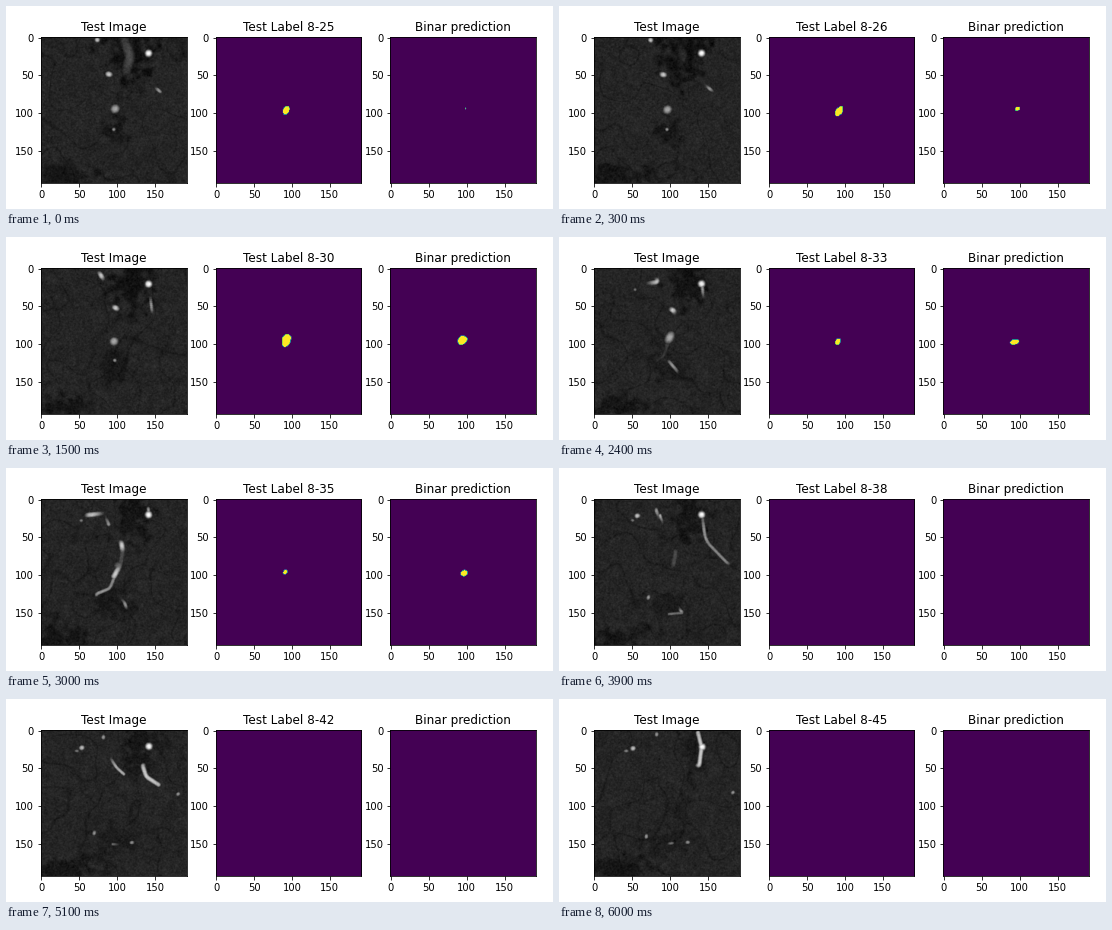
Recreate the animation shown at these times as a matplotlib script. Size 547 px wide and 203 px high, loop 6300 ms.

```python
import numpy as np
import matplotlib.pyplot as plt
from matplotlib.animation import FuncAnimation

W, H, DPI = 547, 203, 72
N, FRAMES, STEP = 192, 21, 300
FIRST, LAST_LABEL = 25, 36
SIDE, LEFT, BOTTOM = 145.6, 35.0, 26.2
THICK = 1.5  # slice thickness, in slices

rng = np.random.default_rng(8)
yy, xx = np.mgrid[0:N, 0:N].astype(float)


def smooth_noise(scale, depth):
    """Unit-variance volume noise, blurred in plane and across slices."""
    f = np.fft.fftn(rng.standard_normal((FRAMES, N, N)))
    fz, fy, fx = np.meshgrid(np.fft.fftfreq(FRAMES), np.fft.fftfreq(N),
                             np.fft.fftfreq(N), indexing="ij")
    f *= np.exp(-2 * np.pi**2 * (scale**2 * (fx**2 + fy**2) + depth**2 * fz**2))
    v = np.fft.ifftn(f).real
    return v / v.std()


folds = smooth_noise(13, 1.2)
wobble = smooth_noise(3, .7)
grain = smooth_noise(.6, 0)


def tube(radius, light, *keys):
    """A vessel in space through (x, y, slice) points, corners rounded."""
    keys = np.array(keys, float)
    t = np.linspace(0, len(keys) - 1, 24 * (len(keys) - 1) + 1)
    path = np.array([np.interp(t, range(len(keys)), c) for c in keys.T])
    padded = np.pad(path, ((0, 0), (5, 5)), mode="edge")
    path = np.array([np.convolve(c, np.full(11, 1 / 11), "valid") for c in padded])
    return radius, light, path.T


arteries = [
    tube(4.6, 255, (141, 21, 24), (141, 20, 38), (142, 22, 46)),
    tube(3.6, 200, (87, 48, 24), (94, 50, 28), (105, 56, 34), (107, 68, 36.5),
         (104, 86, 36.5), (95, 102, 34.5)),
    tube(3.3, 190, (73, 3, 24), (75, 4, 28), (84, 18, 33), (58, 21, 36),
         (50, 24, 46)),
    tube(3, 200, (155, 72, 41.5), (138, 61, 42), (133, 46, 42.5),
         (138, 46, 45), (141, 22, 45), (136, 2, 45.5)),
    tube(7, 75, (108, 0, 24), (117, 25, 25), (111, 46, 24)),
]

branches = [
    tube(2.2, 125, (54, 28, 33), (47, 27, 42), (40, 27, 46)),
    tube(2.6, 150, (89, 34, 35), (81, 14, 38), (82, 4, 46)),
    tube(2.2, 170, (86, 20, 38), (93, 40, 41), (99, 49, 42), (109, 58, 42)),
    tube(2.4, 150, (157, 72, 24), (146, 63, 28), (140, 6, 36),
         (146, 54, 38.5), (177, 86, 38.5), (183, 81, 46)),
    tube(2.4, 145, (95, 121, 24), (97, 121, 32), (109, 135, 34),
         (114, 148, 38), (124, 147, 46)),
    tube(2.4, 150, (97, 100, 34.5), (90, 117, 34.5), (73, 124, 35),
         (71, 129, 38), (68, 141, 46)),
    tube(2, 110, (97, 151, 38), (118, 149, 38), (92, 150, 42), (104, 148, 46)),
]

aneurysm = tube(5.5, 165, (98, 93, 24), (94, 97, 28), (97, 95, 32), (101, 87, 34))
vessels = arteries + branches + [aneurysm]


def blob(x, y, rx, ry, i):
    d = np.hypot((xx - x) / rx, (yy - y) / ry) + .3 * wobble[i]
    return np.exp(-np.maximum(d, 0) ** 4)


def scan(i):
    s, fade = FIRST + i, 1 - .5 * i / FRAMES
    img = 37 + 1.5 * wobble[i]
    img *= 1 - .25 * np.exp(-(folds[i] / .1) ** 2)
    # air-filled cavities
    img *= 1 - .6 * fade * blob(116 + .7 * i, 18, 28 - .7 * i, 34, i)
    img *= 1 - .35 * fade * blob(98, 125 + i, 14 + .8 * i, 18, i)
    img *= 1 - .4 * blob(30, 182, 40, 14, i)
    for radius, light, path in vessels:
        for x, y, z in path:
            w = np.exp(-((z - s) / THICK) ** 2)
            if w > .12:
                d = np.hypot(xx - x, yy - y) / radius
                img = np.maximum(img, light * w * np.exp(-d ** 3))
    return np.clip(img + 4.5 * grain[i], 0, 255)


def ellipse(x, y, r, stretch, i):
    """Slanted ellipse with a slightly ragged edge."""
    dx, dy = xx - x, yy - y
    d = np.hypot((dx + .25 * dy) / stretch, dy * stretch)
    return (d < r * (1 + .15 * wobble[i])).astype(float)


def label(i):
    s = FIRST + i
    r = 6.6 / (1 + ((s - 28.5) / 5.5) ** 2) if s <= LAST_LABEL else 0
    return ellipse(92 - .15 * i, 96.5 - .1 * i, r, .88, i)


def prediction(i):
    u = FIRST + i - 30.8
    r = 5.3 * np.sqrt(max(0, 1 - (u / 5.9) ** 2))
    return ellipse(94.3 + .14 * u * u, 93.5 + .35 * i, r, 1.12, i)


fig = plt.figure(figsize=(W / DPI, H / DPI), dpi=DPI, facecolor="white")


def panel(k, title, cmap, vmax):
    ax = fig.add_axes([(LEFT + 1.2 * SIDE * k) / W, BOTTOM / H,
                       SIDE / W, SIDE / H])
    im = ax.imshow(np.zeros((N, N)), cmap=cmap, vmin=0, vmax=vmax)
    ax.set_xticks(range(0, N, 50))
    ax.set_yticks(range(0, N, 50))
    ax.set_title(title)
    return ax, im


_, scan_im = panel(0, "Test Image", "gray", 255)
label_ax, label_im = panel(1, "", "viridis", 1)
_, pred_im = panel(2, "Binar prediction", "viridis", 1)


def draw(i):
    scan_im.set_data(scan(i))
    label_im.set_data(label(i))
    pred_im.set_data(prediction(i))
    label_ax.set_title(f"Test Label 8-{FIRST + i}")
    return scan_im, label_im, pred_im


anim = FuncAnimation(fig, draw, frames=FRAMES, interval=STEP,
                     repeat=True, repeat_delay=0, blit=False)
plt.show()
```
